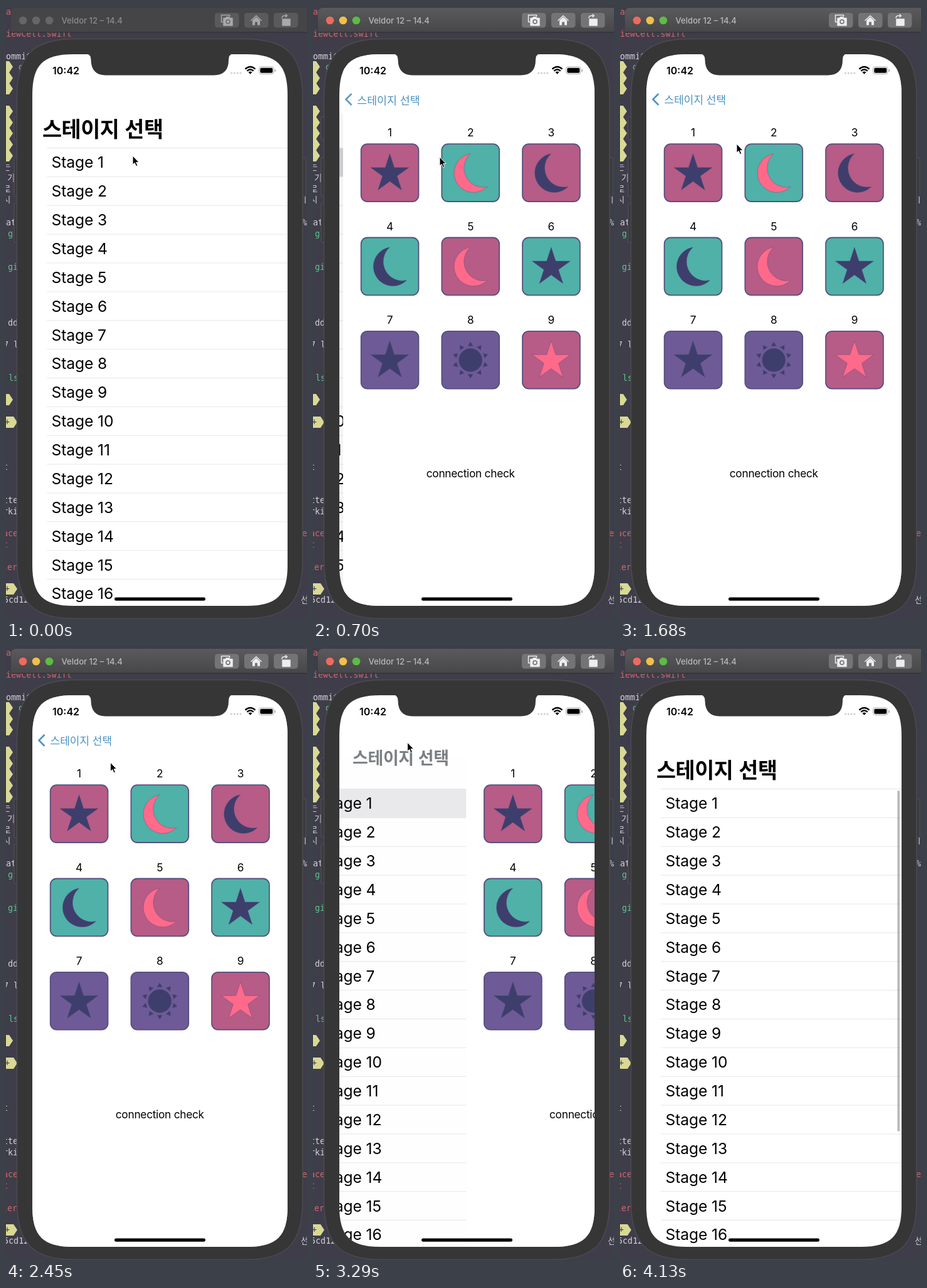
An HTML page for the animation above (4.2 s loop, 480 by 978 pixels).

```html
<!DOCTYPE html>
<html lang="ko">
<head>
<meta charset="utf-8">
<title>Stage list</title>
<style>
  html, body { margin: 0; width: 100%; height: 100%; overflow: hidden; background: #3f3d4a; }
  svg { display: block; width: 480px; height: 978px; font-family: Inter, "Noto Sans CJK KR", "Noto Sans CJK", sans-serif; }
  text { white-space: pre; }
  .term { font: 13.4px "DejaVu Sans Mono", "Noto Sans CJK KR", "Noto Sans CJK", monospace; }
  .row { font-size: 24.6px; letter-spacing: -.1px; }
  .num { font-size: 17.3px; text-anchor: middle; letter-spacing: -.27px; }
  .ko { font-family: "Noto Sans CJK KR", "Noto Sans CJK", sans-serif; }
</style>
</head>
<body>
<svg id="stage" viewBox="0 0 480 978"></svg>
<script>
const LOOP = 4200, STEP = 70, LEFT = 42, WIDTH = 407, ROW = 45.87;
const PINK = '#b65c86', TEAL = '#4fb1a8', PURPLE = '#6d5a96', DARK = '#3e3e6c', ROSE = '#ff6a8a';
const times = (n, fn) => Array.from({ length: n }, (_, i) => fn(i)).join('');
const rect = (x, y, w, h, fill, r = 0, more = '') =>
  `<rect x="${x}" y="${y}" width="${w}" height="${h}" rx="${r}" fill="${fill}" ${more}/>`;
const text = (x, y, s, more = '') => `<text x="${x}" y="${y}" ${more}>${s}</text>`;

// Rectangle with continuous corners: e is their reach, c the handle's distance from the corner.
function smoothRect(x, y, w, h, e, c, more) {
  const r = x + w, b = y + h;
  return `<path d="M${x} ${y + e}C${x} ${y + c} ${x + c} ${y} ${x + e} ${y}H${r - e}C${r - c} ${y} ${r} ${y + c} ${r} ${y + e}` +
    `V${b - e}C${r} ${b - c} ${r - c} ${b} ${r - e} ${b}H${x + e}C${x + c} ${b} ${x} ${b - c} ${x} ${b - e}Z" ${more}/>`;
}
const screenShape = smoothRect(LEFT, 77, WIDTH, 880, 65, 17, 'fill="#fff"');

function terminal() {
  const red = '#cf686b', green = '#5cc58c', white = '#d3d3d8';
  const lines = [
    [-8, 9, 'Pages', red], [0, 44, 'iewCell.swift', red], [0, 80, 'ommit', white], [20, 97, 'g', green],
    [-5, 256, '는', white], [2, 274, '기', white], [-5, 292, '로', white], [-5, 309, '시', white],
    [0, 345, 'at', white], [3, 363, 'g', green], [3, 416, 'git', green], [3, 505, 'dd', white],
    [-4, 540, '7 l', white], [4, 593, 'ls', green], [-5, 735, 't', white], [-5, 788, 'tte', white],
    [-5, 806, 'rki', white], [-5, 841, 'ace', red], [-5, 859, 't', red], [-6, 895, 'ler', red],
    [-4, 947, '5cd12', white], [471, 309, 'ㅣ', white], [472, 345, '%', white],
    [472, 841, 'e', red], [470, 947, '선', white]
  ];
  const tag = (y, tip) => `<path d="M0 ${y - 9}H${tip - 6}L${tip} ${y}L${tip - 6} ${y + 9}H0Z" fill="#d9d995"/>`;
  return [97, 115, 132, 168, 186, 203, 221, 239, 628].map(y => tag(y, 11)).join('') +
    [664, 930].map(y => tag(y, 18) + text(-2, y + 4, '+', 'class="term" fill="#3d3b48"')).join('') +
    lines.map(([x, y, s, c]) => text(x, y + 5, s, `class="term" fill="${c}"`)).join('');
}

function body() {
  const key = (x, y, h) => rect(x, y, 7, h, '#3a393d', 1.5, 'stroke="#56555c"');
  return key(13, 177, 36) + key(13, 242, 62) + key(13, 315, 62) + key(471, 242, 62) +
    smoothRect(17.5, 52.5, 455.5, 925, 94, 25, 'fill="#363636" stroke="#4d4c50" stroke-width="1.4"') +
    screenShape;
}

function polar(cx, cy, r, deg) {
  const a = deg * Math.PI / 180;
  return `${(cx + r * Math.sin(a)).toFixed(2)},${(cy - r * Math.cos(a)).toFixed(2)} `;
}
const shapes = {
  star: `<polygon points="${times(10, i => polar(46.7, 48.3, i % 2 ? 12.2 : 32, i * 36))}"/>`,
  moon: '<path d="M46.5 16.5A31 31 0 1 0 73.5 69A30.5 30.5 0 0 1 46.5 16.5Z"/>',
  sun: '<circle cx="46.7" cy="47" r="18.6"/>' + times(10, i =>
    `<polygon points="-4,-22.5 4,-22.5 0,-29" transform="translate(46.7 47) rotate(${i * 36})"/>`)
};
function detail() {
  const tiles = [
    [PINK, 'star', DARK], [TEAL, 'moon', ROSE], [PINK, 'moon', DARK],
    [TEAL, 'moon', DARK], [PINK, 'moon', ROSE], [TEAL, 'star', DARK],
    [PURPLE, 'star', DARK], [PURPLE, 'sun', DARK], [PINK, 'star', ROSE]
  ];
  return rect(LEFT, 77, WIDTH + 20, 880, '#fff') + tiles.map(([back, shape, fill], i) => {
    const x = 69.8 + i % 3 * 128.7, y = 219.3 + Math.floor(i / 3) * 149.3;
    return `<g transform="translate(${x} ${y})">` + text(46.7, -11, i + 1, 'class="num"') +
      rect(.9, .9, 91.8, 91.8, back, 10, 'stroke="#57507f" stroke-width="1.8"') +
      `<g fill="${fill}" stroke="#50467c" stroke-opacity=".5" stroke-width=".8">${shapes[shape]}</g></g>`;
  }).join('') + text(245.3, 751.5, 'connection check', 'class="num"');
}

function list() {
  return rect(LEFT, 226, WIDTH + 130, 46, '#d5d4da', 0, 'id="highlight"') +
    times(17, i => rect(65, 226 + i * ROW, WIDTH + 100, 1, '#e7e7e9')) +
    times(16, i => text(72.5, 258.4 + i * ROW, `Stage ${i + 1}`, 'class="row"')) +
    rect(442.4, 229, 3.6, 544, '#000', 1.8, 'id="scroller"');
}

function status() {
  return `<path d="M129 76Q135.500 78 135.500 86Q136 110.500 159 110.500H331Q355 110.500 355 86Q355 78 361 76Z" fill="#363636"/>` +
    text(74, 108.7, '10:42', 'font-size="16" font-weight="600"') +
    times(4, i => `<circle cx="${359.5 + i * 4.8}" cy="107" r="1.6" fill="#cfcfcf"/>`) +
    '<g fill="none" stroke="#000" stroke-width="2.4"><path d="M381.500 100.500Q389.500 93.500 397.500 100.500"/>' +
    '<path d="M384.300 103.600Q389.500 99 394.700 103.600"/></g><path d="M386.500 105.500Q389.500 103.500 392.500 105.500L389.500 108.700Z"/>' +
    rect(403.5, 97, 23.5, 11.5, '#fff', 3.2, 'stroke="#aaa"') + rect(405.3, 98.8, 20, 8, '#000', 1.8) +
    rect(428.5, 101, 1.5, 4, '#aaa', .7) + rect(173, 943.5, 145, 5.2, '#000', 2.6);
}

function titlebar() {
  const button = x => rect(x, 11, 38.5, 23.5, 'currentColor', 4.5);
  return `<path id="bar" d="M8 42V11Q8 3 16 3H480V42Z"/><path d="M8 42H480" stroke="#2c2b2e"/>` +
    times(3, i => `<circle class="light" cx="${27 + i * 21}" cy="23" r="6.300"/>`) +
    text(88.5, 28, 'Veldor 12 – 14.4', 'id="caption" font-size="13.1" font-weight="500"') +
    `<g id="buttons">${[333, 380, 427].map(button).join('')}</g>` +
    `<g id="icons" fill="none" stroke="currentColor" stroke-width="1.5" stroke-linejoin="round">
      <path d="M346 25.500H343.500V14.500H356.500V17"/>
      <path d="M347 19.500H350L351.500 17.800H355.500L357 19.500H361V31H347Z" fill="currentColor"/>
      <circle cx="354" cy="25" r="3" stroke="#6c6b6d"/>
      <path d="M390.500 23.500L399 15.500L407.500 23.500"/>
      <path d="M393 23L399 17.500L405 23V30.500H401V25.500H397V30.500H393Z" fill="currentColor" stroke="none"/>
      <path d="M441 21H453V31H441Z" fill="currentColor"/>
      <path d="M440 19.500Q440 15.500 444 15.500H447M445.500 13L448.500 15.500L445.500 18"/></g>`;
}

const svg = document.getElementById('stage');
svg.innerHTML = `<defs><clipPath id="screen">${screenShape}</clipPath>
  <linearGradient id="metal" x2="0" y2="1"><stop stop-color="#5a595b"/><stop offset="1" stop-color="#474648"/></linearGradient></defs>
  ${rect(0, 0, 480, 978, '#3f3d4a')}${terminal()}${body()}
  <g clip-path="url(#screen)"><g id="list">${list()}</g>
    ${rect(LEFT, 172, WIDTH, 800, '#000', 0, 'id="dim"')}
    <g id="detail">${detail()}</g>
    <g id="large">${text(0, 0, '스테이지 선택', 'class="ko" font-size="33.8" font-weight="700" letter-spacing="-.5"')}</g>
    <g id="back" fill="#4a92c2">
      <path id="chevron" d="M61.500 140L52.500 149L61.500 158" fill="none" stroke="#4a92c2" stroke-width="2.500"/>
      <g id="backLabel">${text(0, 0, '스테이지 선택', 'class="ko" font-size="17"')}</g></g>
  </g>${status()}${titlebar()}
  <path id="cursor" d="M0 0V14.200L3.200 11.300L5.600 16.600L7.900 15.600L5.600 10.400H10Z" stroke="#fff" stroke-width="1"/>`;

const $ = id => document.getElementById(id);
const set = (id, attrs) => { for (const k in attrs) $(id).setAttribute(k, attrs[k]); };
const move = (id, x, y, s = 1) => set(id, { transform: `translate(${x} ${y}) scale(${s})` });
const lights = [...svg.querySelectorAll('.light')];

// Critically damped spring from 0 to 1.
function spring(ms) {
  const x = Math.max(0, ms) * .01775;
  return 1 - (1 + x) * Math.exp(-x);
}
const path = [[0, 202, 239], [140, 202, 241], [800, 202, 241], [1500, 186, 220], [2000, 186, 220],
  [2870, 149, 152], [3220, 149, 152], [3430, 155, 153], [3570, 155, 153], [3920, 230, -25], [LOOP, 230, -25]];
function cursorAt(t) {
  const i = path.findIndex(p => p[0] > t), [t0, x0, y0] = path[i - 1], [t1, x1, y1] = path[i];
  const u = (t - t0) / (t1 - t0), e = u * u * (3 - 2 * u);
  return [x0 + (x1 - x0) * e, y0 + (y1 - y0) * e];
}

function draw(t) {
  const p = t < 3196 ? spring(t - 350.6) : 1 - spring(t - 3196);
  const q = Math.pow(p, 1.3), active = t >= 140;

  move('list', -.3 * WIDTH * p, 0);
  set('highlight', { opacity: t < 280 ? 0 : t < 3196 ? 1 : p });
  set('scroller', { opacity: .28 * Math.min(1, Math.max(0, (t - 3700) / 150)) });
  set('dim', { opacity: .045 * p ** 3 });
  move('detail', WIDTH * (1 - p), 0);

  const x = 58 + 12.5 * q, y = 209 - 53.5 * q, scale = 1 - .495 * q;
  move('large', x, y, scale);
  set('large', { opacity: 1 - p });
  move('backLabel', x, y, scale / .505);
  set('back', { opacity: p * (t >= 3080 ? .18 : 1) });
  set('chevron', { opacity: p ** 4 });

  set('bar', { fill: active ? 'url(#metal)' : '#454447' });
  set('caption', { fill: active ? '#b9b8ba' : '#8b8a8c' });
  set('buttons', { color: active ? '#747375' : '#5a595b' });
  set('icons', { color: active ? '#ededed' : '#a9a9aa' });
  lights.forEach((el, i) => el.setAttribute('fill', active ? ['#ee6a5f', '#f0bf4c', '#5dbb46'][i] : '#666567'));
  move('cursor', ...cursorAt(t));
}

const start = performance.now();
function tick(now) {
  const t = Math.max(0, now - start) % LOOP;
  draw(Math.floor((t + .01) / STEP) * STEP % LOOP);
  requestAnimationFrame(tick);
}
draw(0);
requestAnimationFrame(tick);
</script>
</body>
</html>
```
